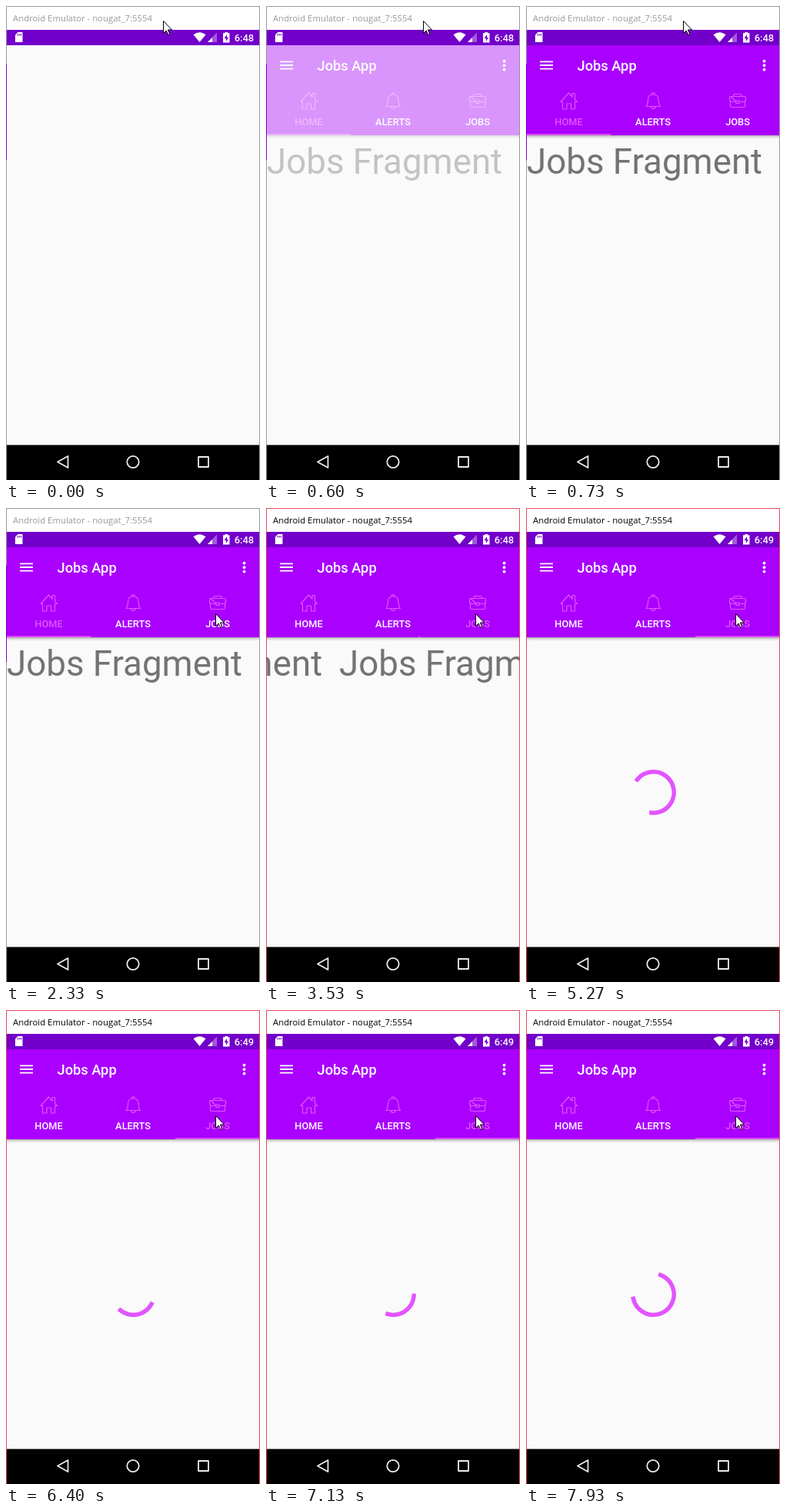
Write an HTML page that moves like this. It is 330 by 616 pixels and loops after 8000 ms.

```html
<!DOCTYPE html>
<html lang="en">
<head>
<meta charset="utf-8">
<title>Jobs App</title>
<style>
  html, body { margin: 0; width: 100%; height: 100%; overflow: hidden; background: #fafafa; }
  svg { display: block; }
  text { font-family: Roboto, sans-serif; white-space: pre; }
  .medium { font-weight: 500; fill: #fff; }
  .tab { font-size: 12.8px; text-anchor: middle; }
  .tab.selected { fill: #e254ff; }
  .page { font-size: 45.7px; fill: #737373; }
  .icon { fill: none; stroke: #e254ff; stroke-width: 1.2; stroke-linejoin: round; stroke-linecap: round; }
  .nav { fill: none; stroke: #ececec; stroke-width: 1.8; stroke-linejoin: round; }
</style>
</head>
<body>
<svg width="100%" height="100%" viewBox="0 0 330 616">
  <defs>
    <linearGradient id="shade" x2="0" y2="1">
      <stop stop-opacity=".32"/>
      <stop offset=".4" stop-opacity=".12"/>
      <stop offset="1" stop-opacity="0"/>
    </linearGradient>
  </defs>

  <rect width="330" height="616" fill="#fafafa"/>
  <rect width="330" height="31" fill="#fff"/>
  <text id="windowTitle" x="9" y="20" style="font: 11.35px 'Open Sans', sans-serif">Android Emulator - nougat_7:5554</text>

  <g id="app">
    <svg x="1" y="168" width="328" height="402">
      <g id="pages">
        <text class="page" y="49.5">Jobs Fragment</text>
        <text class="page" x="328" y="49.5">Jobs Fragment</text>
        <circle id="spinner" r="26.7" pathLength="360" fill="none" stroke="#e254ff" stroke-width="5.5" stroke-linecap="square"/>
      </g>
    </svg>
    <rect x="1" y="168" width="328" height="5" fill="url(#shade)"/>
    <rect x="1" y="51" width="328" height="117" fill="#a0f"/>
    <path d="M18 72.4h17M18 77h17M18 81.6h17" stroke="#fff" stroke-width="1.9"/>
    <text class="medium" x="66.5" y="84" font-size="18.3">Jobs App</text>
    <g fill="#fff">
      <circle cx="309.5" cy="71.7" r="1.9"/><circle cx="309.5" cy="77.2" r="1.9"/><circle cx="309.5" cy="82.7" r="1.9"/>
    </g>
    <g class="icon">
      <path d="M45 124.5L55.5 113L60 118V113.5H63.5V121.5L66.5 124.5H63.5V134H58.5V127H53V134H47.5V124.5Z"/>
      <path d="M156 130.5C158 128 158.5 126 158.5 121.5C158.5 117.500 161 115 165.200 115S172 117.500 172 121.500C172 126 172.500 128 174.500 130.500ZM163.500 115V113H167V115M162.500 130.500C162.500 134.500 168 134.500 168 130.500"/>
      <path d="M266 117.500H284Q285.500 117.500 285.500 119V121.500Q285.500 124.500 282 124.500H277M273 124.500H268Q264.500 124.500 264.500 121.500V119Q264.500 117.500 266 117.500ZM270 117.500V115.500Q270 114.500 271 114.500H279Q280 114.500 280 115.500V117.500M273 123H277V126.500H273ZM265.500 124V130Q265.500 131.500 267 131.500H283Q284.500 131.500 284.500 130V124"/>
    </g>
    <text id="homeTab" class="medium tab" x="55.5" y="155">HOME</text>
    <text class="medium tab" x="165" y="155">ALERTS</text>
    <text id="jobsTab" class="medium tab" x="275" y="155">JOBS</text>
    <rect id="indicator" y="166.200" height="1.8" fill="#e254ff"/>
  </g>

  <rect y="31" width="330" height="20" fill="#7200ca"/>
  <g fill="#fff">
    <path d="M15.500 34H21.500V47H12V37.500Z"/>
    <path d="M243.500 37.200Q251.500 31.500 259.500 37.200L251.500 47Z"/>
    <path d="M274 34.500V47H262Z" opacity=".35"/>
    <path d="M268 41V47H262Z"/>
    <path d="M284.500 34H288V35.300H290.500V47.500H282V35.300H284.500Z"/>
  </g>
  <path d="M15.500 36v2.500M17.500 36v2.500M19.500 36v2.500" stroke="#7200ca"/>
  <path d="M287 37L283.500 42H285.800V46L289 41H287Z" fill="#7200ca"/>
  <text id="clock" class="medium" x="296.800" y="45.600" font-size="12.8"></text>

  <rect y="570.500" width="330" height="46"/>
  <g class="nav">
    <path d="M67 592.500L80.500 585V600Z"/>
    <circle cx="165" cy="592.500" r="7.700"/>
    <rect x="250" y="586" width="13" height="13"/>
  </g>

  <path id="border" d="M.5 616V.5H329.500V616" fill="none"/>
  <path id="leftEdge" d="M.5 75V200" stroke="#8a00d0"/>
  <path id="cursor" d="M.5 .5V16.500L4.200 13L6.700 18.500L8.800 17.600L6.400 12H11.500Z" fill="#fff" stroke="#000"/>
</svg>

<script>
const LOOP = 8000, STEP = 1000 / 15, PAGE = 328;
const FOCUS = 3130, SLIDE = 3508, SPIN = 3532, MINUTE = 4800;

const el = id => document.getElementById(id);
const clamp = v => Math.min(1, Math.max(0, v));
const mix = (a, b, k) => a + (b - a) * k;
const set = (id, attrs) => {
  for (const name in attrs) el(id).setAttribute(name, attrs[name]);
};

// Cubic Bezier easing (0.4, 0, 0.2, 1), solved by bisection
function fastOutSlowIn(x) {
  let lo = 0, hi = 1;
  for (let i = 0; i < 24; i++) {
    const s = (lo + hi) / 2, r = 1 - s;
    if (1.2 * r * r * s + .6 * r * s * s + s ** 3 < x) lo = s; else hi = s;
  }
  return lo * lo * (3 - 2 * lo);
}

function drawSpinner(t) {
  const elapsed = Math.max(0, t - SPIN);
  const phase = elapsed / 1333 % 1;
  const tail = 270 * fastOutSlowIn(clamp(2 * phase - 1));
  const head = 270 * fastOutSlowIn(clamp(2 * phase));
  const angle = elapsed * 720 / 4444 + 90 * phase + tail - 90;
  set('spinner', {
    transform: `translate(${2 * PAGE + 164.5} 201.5) rotate(${angle})`,
    'stroke-dasharray': `${head - tail} 360`
  });
}

function draw(time) {
  const frame = Math.floor((time % LOOP + 4) / STEP);
  const t = frame * STEP;
  const focused = t >= FOCUS, sliding = t >= SLIDE;

  set('app', { opacity: clamp((frame - 8) * .4) });
  set('windowTitle', { fill: focused ? '#000' : '#999' });
  set('border', { stroke: focused ? '#e84a58' : '#999' });
  set('leftEdge', { opacity: focused ? 0 : 1 });
  el('clock').textContent = t < MINUTE ? '6:48' : '6:49';
  el('homeTab').classList.toggle('selected', !sliding);
  el('jobsTab').classList.toggle('selected', sliding);

  const move = clamp((frame - 24) / 11);
  const k = move * move * (3 - 2 * move);
  set('cursor', { transform: `translate(${Math.round(mix(204, 272, k))} ${Math.round(mix(19, 137, k))})` });

  const slide = clamp((t - SLIDE) / 300);
  const scroll = 2 * PAGE * (1 - (1 - slide) ** 5);
  set('pages', { transform: `translate(${-scroll} 0)` });

  // The marker grows out of a point just left of the chosen tab
  const grow = fastOutSlowIn(slide);
  const left = sliding ? mix(198, 220, grow) : 1;
  const right = sliding ? mix(198, 329, grow) : 110.5;
  set('indicator', { x: left, width: right - left });

  drawSpinner(t);
}

const start = performance.now();
function tick() {
  draw(performance.now() - start);
  requestAnimationFrame(tick);
}
tick();
</script>
</body>
</html>
```
